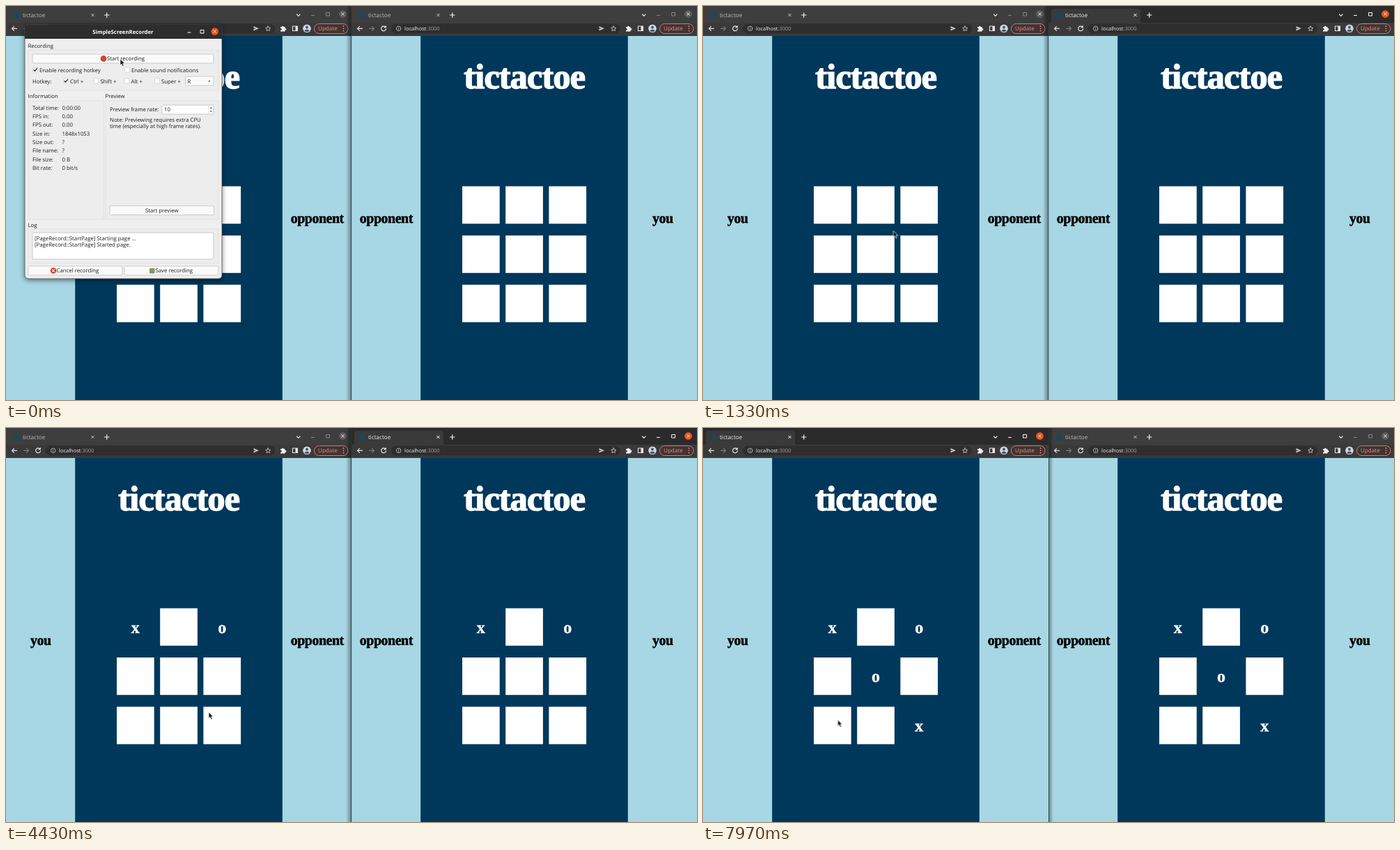
Recreate the animation shown at these times as an HTML page. Size 992 px wide and 565 px high, loop 8000 ms.

```html
<!DOCTYPE html>
<html lang="en">
<head>
<meta charset="utf-8">
<title>tictactoe</title>
<style>
  html, body { margin: 0; width: 100%; height: 100%; overflow: hidden; background: #a7d7e4; }
  svg { display: block; width: 100vw; height: 100vh; }
  text { font: 7.8px "Open Sans", "Noto Sans", sans-serif; text-rendering: geometricPrecision; white-space: pre; }
  .ui { font-size: 8.1px; }
  .bold { font-weight: 700; }
  .mid { text-anchor: middle; }
  .serif { font-family: "Liberation Serif", serif; font-weight: 700; text-anchor: middle; }
  .logo { font-size: 50px; letter-spacing: -.7px; fill: #fff; stroke: #fff; stroke-width: 1.5px; }
  .player { font-size: 20px; letter-spacing: -.5px; stroke: #000; stroke-width: .5px; }
  .mark text { font-size: 24px; fill: #fff; stroke: #fff; stroke-width: .4px; }
  .line { fill: none; stroke-linecap: round; stroke-linejoin: round; }

  .step { animation: 8s step-end infinite; }
  .on0 { animation-name: focus-left; }
  .on1 { animation-name: focus-right; }
  .m0 { animation-name: move0; }
  .m1 { animation-name: move1; }
  .m2 { animation-name: move2; }
  .m3 { animation-name: move3; }
  .ready { animation-name: ready; }
  .running { animation-name: running; }
  .front { animation-name: front; }
  #dialog { transform-origin: -53px 209px; animation: minimize 8s linear infinite; }
  #cursor { animation: pointer 8s linear infinite; }

  @keyframes focus-left {
    0% { opacity: 0 } 22.9% { opacity: 1 } 36.3% { opacity: 0 }
    57.2% { opacity: 1 } 75.8% { opacity: 0 } 99.6%, to { opacity: 1 }
  }
  @keyframes focus-right {
    0% { opacity: 0 } 8.38% { opacity: 1 } 22.9% { opacity: 0 }
    36.3% { opacity: 1 } 57.2% { opacity: 0 } 75.8% { opacity: 1 } 99.6%, to { opacity: 0 }
  }
  @keyframes move0 { 0% { opacity: 0 } 23.6%, to { opacity: 1 } }
  @keyframes move1 { 0% { opacity: 0 } 37%, to { opacity: 1 } }
  @keyframes move2 { 0% { opacity: 0 } 58%, to { opacity: 1 } }
  @keyframes move3 { 0% { opacity: 0 } 76.4%, to { opacity: 1 } }
  @keyframes ready { 0% { opacity: 1 } .37%, to { opacity: 0 } }
  @keyframes running { 0% { opacity: 0 } .37%, to { opacity: 1 } }
  @keyframes front { 0% { opacity: 1 } 8.38%, to { opacity: 0 } }
  @keyframes minimize {
    0% { transform: none; opacity: 1 }
    8.38% { transform: scale(1); opacity: 1; animation-timing-function: cubic-bezier(.7, 0, .84, 0) }
    13.38%, to { transform: scale(0); opacity: 0 }
  }
  @keyframes pointer {
    0% { transform: translate(164px, 76px); animation-timing-function: ease-in-out }
    8.3%, 9.25% { transform: translate(263px, 37px) }
    11.25% { transform: translate(261px, 55px) }
    16.63% { transform: translate(273.5px, 322.5px); animation-timing-function: ease-out }
    21.25% { transform: translate(190px, 290px) }
    23.75% { transform: translate(190px, 290px); animation-timing-function: ease-in }
    27.5% { transform: translate(420px, 340px) }
    32.88% { transform: translate(750px, 365px); animation-timing-function: ease-out }
    35.75% { transform: translate(800px, 292px) }
    37.6% { transform: translate(800px, 292px); animation-timing-function: ease-in }
    41.6% { transform: translate(592px, 321px) }
    46.25% { transform: translate(410px, 360px); animation-timing-function: ease-out }
    50.6% { transform: translate(273.5px, 380px) }
    52.1% { transform: translate(277px, 382px) }
    55.4% { transform: translate(291px, 407.5px) }
    56.5% { transform: translate(303px, 422px) }
    58.5% { transform: translate(303px, 422px); animation-timing-function: ease-in }
    62.9% { transform: translate(539px, 394px); animation-timing-function: ease-out }
    68.1% { transform: translate(794px, 322px) }
    71.25% { transform: translate(769px, 351px) }
    72.9% { transform: translate(756px, 356px) }
    74.1% { transform: translate(742.5px, 356px) }
    88.4% { transform: translate(742.5px, 356px); animation-timing-function: ease-in-out }
    95%, to { transform: translate(193.5px, 418.5px) }
  }
</style>
</head>
<body>
<svg id="stage" viewBox="0 0 992 565" preserveAspectRatio="none"></svg>
<script>
const NAVY = '#00385c', SKY = '#a7d7e4', ORANGE = '#e95420';

const rect = (x, y, w, h, fill, more = '') =>
  `<rect x="${x}" y="${y}" width="${w}" height="${h}" fill="${fill}" ${more}/>`;
const circle = (x, y, r, fill) => `<circle cx="${x}" cy="${y}" r="${r}" fill="${fill}"/>`;
const line = (d, color, width = 1) =>
  `<path class="line" d="${d}" stroke="${color}" stroke-width="${width}"/>`;
const text = (x, y, s, fill = '#1c1c1c', cls = '') =>
  `<text x="${x}" y="${y}" fill="${fill}" class="${cls}">${s}</text>`;
const group = (cls, body, more = '') => `<g class="${cls}" ${more}>${body}</g>`;
const cross = (x, y, r, color, width) =>
  line(`M${x - r} ${y - r}l${2 * r} ${2 * r}m0 ${-2 * r}l${-2 * r} ${2 * r}`, color, width);

// Browser frame: tab strip and toolbar
function browserBar(active) {
  const ink = active ? '#fff' : '#c4c4c4';
  const dim = active ? '#fff' : '#858585';
  const icon = '#e6e6e6';
  return rect(0, 0, 496, 43, '#3a3a3a')
    + rect(0, 0, 496, 24, active ? '#2b2b2b' : '#3e3e3e')
    + (active ? '<path d="M0 24.5q4 0 4-4V8q0-4 4-4h120q4 0 4 4v12.500q0 4 4 4z" fill="#3a3a3a"/>' : '')
    + circle(15, 13, 4.4, '#17495c')
    + text(24, 16, 'tictactoe', active ? '#eee' : '#bdbdbd', 'ui')
    + cross(124.500, 13, 1.8, ink, 1)
    + line('M141.500 13h6.500m-3.250-3.250v6.500', '#f2f2f2', 1.2)
    + line('M417.500 12l2.300 2.300 2.300-2.300', icon, 1.2)
    + line('M438.500 13.500h4', dim)
    + line('M460 9.500h4.500v4.500h-4.500z', dim)
    + circle(483.500, 11.500, 5.4, active ? ORANGE : '#5d5d5d')
    + cross(483.500, 11.500, 1.7, '#fff', 1)
    + line('M15.500 32.300h-7m3-3l-3 3 3 3', icon, 1.2)
    + line('M25.500 32.300h7m-3-3l3 3-3 3', '#7c7c7c', 1.2)
    + line('M48.900 30.300a3.400 3.400 0 1 0 .6 2.600M49.300 28.500v2.200h-2.200', icon, 1.2)
    + rect(57, 25.500, 329, 14, '#2e2e2e', 'rx="7"')
    + line('M71 32.300a3.300 3.300 0 1 1-6.600 0a3.300 3.300 0 1 1 6.600 0M67.700 32v2m0-3.600v.1', '#c9c9c9', .8)
    + '<text x="76" y="35" style="font-size:7.500px" fill="#efefef">localhost<tspan fill="#a0a0a0">:3000</tspan></text>'
    + '<path d="M355.500 29l7.500 3.300-7.500 3.300v-2.600l4-.7-4-.7z" fill="#c9c9c9"/>'
    + line('M376.200 28.800l1.100 2.300 2.500.3-1.900 1.700.5 2.500-2.200-1.200-2.200 1.200.5-2.500-1.900-1.700 2.500-.3z', '#c9c9c9', .9)
    + '<path d="M394 30h2a1.300 1.300 0 1 1 2.600 0h2v2.200a1.300 1.300 0 1 1 0 2.400V36.500h-6.600v-2a1.300 1.300 0 1 0 0-2.400z" fill="#f2f2f2"/>'
    + line('M411.500 29h7v6.500h-7z', icon, 1.1) + rect(415.500, 29, 3, 6.500, icon)
    + circle(432, 32.300, 5.8, '#d3d7e2') + circle(432, 30.500, 1.9, '#4b5468')
    + '<path d="M428.200 35.800q3.800-4.600 7.600 0q-3.800 2.600-7.600 0z" fill="#4b5468"/>'
    + rect(442.500, 25.500, 48.500, 14, '#403434', 'rx="7" stroke="#d9857c" stroke-width=".9"')
    + text(448, 35.200, 'Update', '#f28b82', 'ui')
    + [29, 32.300, 35.600].map(y => circle(484.500, y, .9, '#f28b82')).join('');
}

// Board
const cellX = c => 159 + c * 62.2, cellY = r => 258.500 + r * 70.6;
const cells = [...Array(9).keys()];
const moves = [['x', 0, 0], ['o', 2, 0], ['x', 2, 2], ['o', 1, 1]];

function browser(i, left, right) {
  const page = rect(0, 0, 496, 565, SKY) + rect(99.200, 43, 297.600, 522, NAVY)
    + text(248.300, 118, 'tictactoe', '#fff', 'serif logo')
    + text(49.800, 311, left, '#000', 'serif player')
    + text(446.700, 311, right, '#000', 'serif player')
    + cells.map(n => rect(cellX(n % 3), cellY(n / 3 | 0), 53.700, 53.700, '#fff')).join('')
    + moves.map(([s, c, r], n) => group(`mark step m${n}`,
        rect(cellX(c) - 1, cellY(r) - 1, 55.700, 55.700, NAVY)
        + text(cellX(c) + 26.800, cellY(r) + 35, s, '#fff', 'serif'))).join('');
  return group('', page + browserBar(false), `transform="translate(${496 * i})"`);
}

// Recorder dialog
const panel = (x, y, w, h) => rect(x, y, w, h, '#ededed', 'stroke="#dadada" stroke-width=".7"');
const field = (x, y, w, h) => rect(x, y, w, h, '#fff', 'rx="1" stroke="#bdbdbd" stroke-width=".8"');
const button = (x, y, w) => rect(x, y, w, 13, '#fafafa', 'rx="1.500" stroke="#c0c0c0" stroke-width=".8"');
const check = (x, y, label, on) => rect(x + .5, y - 3.500, 7, 7, '#fff', 'rx="1" stroke="#c8c8c8" stroke-width=".7"')
  + (on ? line(`M${x + 2} ${y}l1.500 1.800 3-4`, '#222', 1.2) : '') + text(x + 10, y + 3, label);
const arrow = (x, y, d) => `<path d="M${x - 1.700} ${y}h3.400l-1.700 ${2 * d}z" fill="#555"/>`;

function dialogBar(active) {
  const ink = active ? '#fff' : '#8d8d8d';
  return `<path d="M27 47V32q0-5 5-5h273q5 0 5 5v15z" fill="${active ? '#2d2d2d' : '#3c3c3c'}"/>`
    + text(168, 39.700, 'SimpleScreenRecorder', ink, 'bold mid')
    + (active ? '' : circle(263, 36.500, 5.3, '#5d5d5d'))
    + line('M261 38h4', ink) + line('M279.500 34.500h4.500v4.500h-4.500z', ink)
    + circle(299.700, 36.500, 5.3, active ? ORANGE : '#5d5d5d')
    + cross(299.700, 36.500, 1.7, '#fff', 1);
}

const names = ['Total time:', 'FPS in:', 'FPS out:', 'Size in:', 'Size out:', 'File name:', 'File size:', 'Bit rate:'];
const column = (x, list) => list.map((s, n) => text(x, 148.700 + n * 12.350, s)).join('');
const log = (y, list) => list.map((s, n) => text(41, y + n * 9, s)).join('');

const ready = circle(140, 75.500, 4.4, '#c8492f') + text(145, 78.400, 'Start recording')
  + column(80.500, ['0:00:00', '0.00', '0.00', '1848x1053', '?', '?', '0 B', '0 bit/s'])
  + log(335.700, ['[PageRecord::StartPage] Starting page ...', '[PageRecord::StartPage] Started page.']);
const running = rect(134.500, 71.500, 3, 8, '#b4b4b4') + rect(139, 71.500, 3, 8, '#b4b4b4')
  + text(143.500, 78.400, 'Pause recording')
  + column(80.500, ['0:00:00', '0.00', '0.00', '1848x1052', '1848x1052', 'tictac....23.19', '0 B', '0 bit/s'])
  + group('', log(331, ['[PageRecord::StartInput] Starting input ...', '[X11Input::Init] Using X11 shared memory.',
      '[PageRecord::StartInput] Started input.', '[X11Input::InputThread] Input thread started.']), 'clip-path="url(#logbox)"')
  + rect(291, 325.500, 6.500, 37, '#e6e6e6') + rect(291, 333, 6.500, 8, '#cfcfcf')
  + arrow(294.300, 330, -1) + arrow(294.300, 358.500, 1);

const dialog = rect(27, 27, 283, 364, '#efefef', 'rx="5" stroke="#4a4a4a" stroke-width=".8" filter="url(#shade)"')
  + dialogBar(false) + group('step front', dialogBar(true))
  + text(31.500, 59.800, 'Recording') + panel(32, 63, 273, 58)
  + button(38, 69, 260)
  + check(38, 91.500, 'Enable recording hotkey', true) + check(170, 91.500, 'Enable sound notifications')
  + text(38, 110.500, 'Hotkey:')
  + check(82, 107.500, 'Ctrl +', true) + check(125.500, 107.500, 'Shift +')
  + check(169.500, 107.500, 'Alt +') + check(213, 107.500, 'Super +')
  + button(257.500, 101, 40.500) + text(260.500, 110.500, 'R') + arrow(292, 107, 1)
  + text(31.500, 132, 'Information') + panel(32, 136, 108.500, 170) + column(38, names)
  + text(142.500, 132, 'Preview') + panel(143, 136, 162, 170)
  + text(149, 151, 'Preview frame rate:') + field(224, 142, 74, 13) + text(227, 151.200, '10')
  + line('M290.500 142.500v12', '#ccc', .6) + arrow(294.300, 147, -1) + arrow(294.300, 150.500, 1)
  + text(149, 165.800, 'Note: Previewing requires extra CPU') + text(149, 174.800, 'time (especially at high frame rates).')
  + button(149, 286.700, 149.500) + text(223.700, 296, 'Start preview', '#1c1c1c', 'mid')
  + text(31.500, 316.500, 'Log') + panel(32, 320, 273, 49) + field(38, 325, 260, 38)
  + button(32, 373, 135) + circle(68, 379.500, 4.2, '#cf3b2b') + cross(68, 379.500, 1.6, '#fff', 1.2)
  + text(72.500, 382.400, 'Cancel recording')
  + button(170, 373, 135) + rect(206, 376, 7.500, 7.500, '#8a8f78', 'rx="1"') + rect(207.500, 376, 4.500, 3.500, '#6fb33c')
  + text(214.500, 382.400, 'Save recording')
  + group('step ready', ready) + group('step running', running);

const fade = (id, x1, x2) => `<linearGradient id="${id}" x1="${x1}" x2="${x2}">
  <stop stop-opacity=".4"/><stop offset="1" stop-opacity="0"/></linearGradient>`;

document.getElementById('stage').innerHTML = `<defs>${fade('toLeft', 1, 0)}${fade('toRight', 0, 1)}
  <clipPath id="logbox">${rect(38, 325.500, 252, 37, '#000')}</clipPath>
  <filter id="shade" x="-10%" y="-10%" width="120%" height="120%">
    <feDropShadow dx="0" dy="2" stdDeviation="3.500" flood-opacity=".5"/></filter></defs>`
  + browser(0, 'you', 'opponent') + browser(1, 'opponent', 'you')
  + rect(488, 0, 8, 565, 'url(#toLeft)') + rect(495.300, 0, .9, 565, '#2b3a40')
  + group('step on1', browserBar(true), 'transform="translate(496)"')
  + group('step on0', rect(487, 43, 9, 522, SKY) + browserBar(true)
      + rect(496, 0, 7, 565, 'url(#toRight)') + rect(496, 0, .9, 565, '#2b3a40'))
  + `<g id="dialog">${dialog}</g>`
  + `<g id="cursor"><path d="M0 0v9l2-1.800 1.500 3.300 1.700-.8-1.500-3.200h2.800z"
      fill="#161616" stroke="#fff" stroke-width=".7" stroke-linejoin="round"/></g>`;
</script>
</body>
</html>
```
